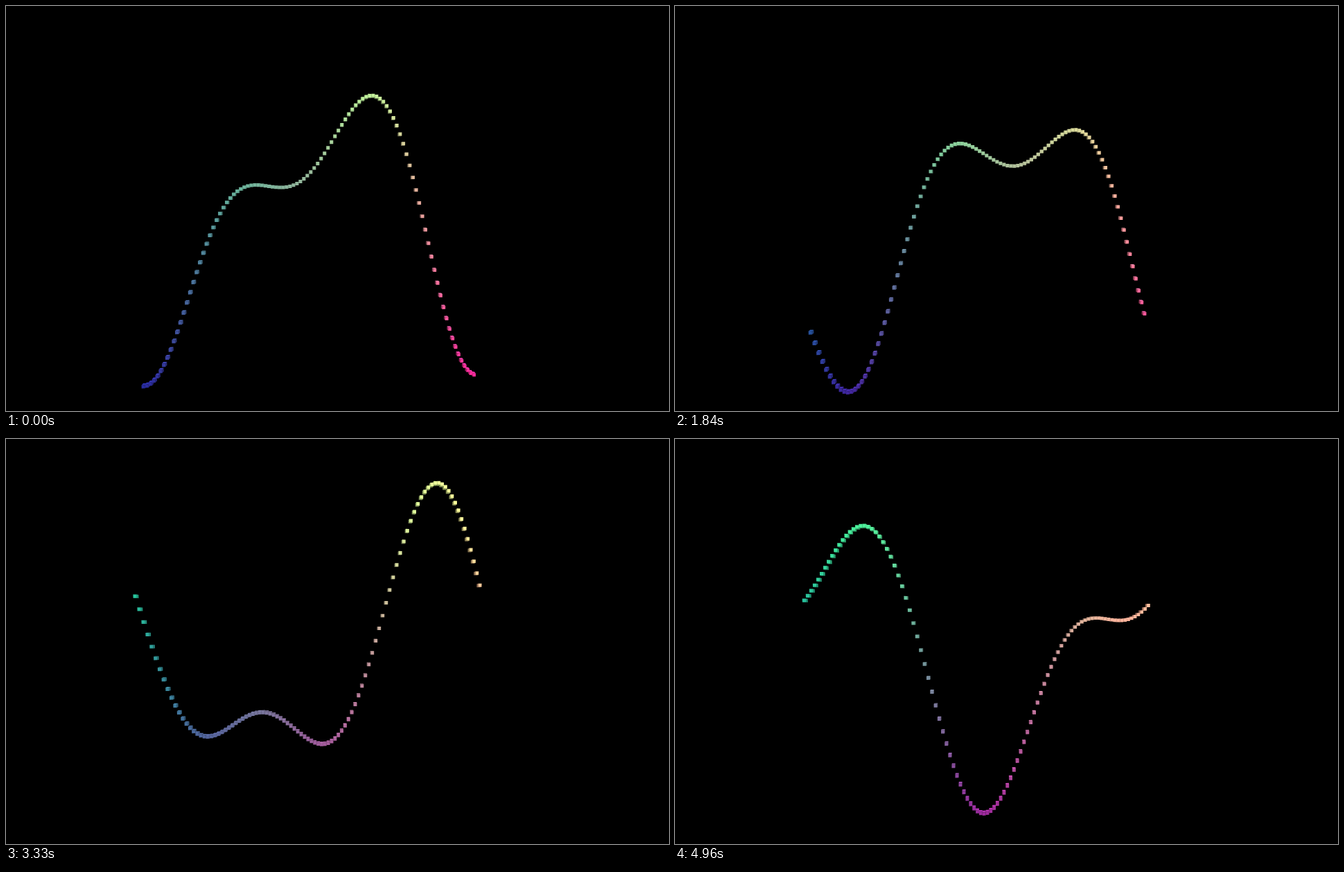
An HTML page with a canvas for the animation above (5040 ms loop, 957 by 585 pixels).

```html
<!DOCTYPE html>
<html lang="en">
<head>
<meta charset="utf-8">
<title>Sine graph</title>
<style>
  html, body { margin: 0; height: 100%; overflow: hidden; background: #000; }
  canvas { display: block; }
</style>
</head>
<body>
<canvas id="stage" width="957" height="585"></canvas>
<script>
const ctx = document.getElementById('stage').getContext('2d');
const { sin, cos, PI, abs, round } = Math;

const LOOP = 5040, STEPS = 65, COUNT = 100, HALF = 0.01;

// [step, start in ms]: steps between two entries are evenly spread
const STARTS = [
  [0, 0], [1, 70], [7, 530], [8, 610], [13, 990], [14, 1070], [15, 1160],
  [21, 1610], [22, 1690], [24, 1840], [25, 1920], [28, 2160], [29, 2240],
  [31, 2410], [32, 2460], [35, 2700], [36, 2780], [42, 3250], [43, 3330],
  [44, 3430], [49, 3800], [50, 3880], [55, 4260], [56, 4350], [57, 4430],
  [63, 4890], [64, 4960]
];
// [step, wave time in s]
const WAVE = [
  [0, 0.394], [13, 1.409], [24, 2.273], [31, 2.819],
  [43, 3.7665], [55, 4.698], [64, 5.394]
];

function lerpAt(knots, k) {
  let i = 1;
  while (i < knots.length - 1 && knots[i][0] < k) i++;
  const [k0, v0] = knots[i - 1], [k1, v1] = knots[i];
  return v0 + (v1 - v0) * (k - k0) / (k1 - k0);
}
const steps = Array.from({ length: STEPS }, (_, k) => ({
  start: round(lerpAt(STARTS, k) / 10) * 10,
  time: lerpAt(WAVE, k)
}));

// Perspective camera, turned slightly right and down
const FOCAL = 506.6, YAW = 0.061, PITCH = 0.065;
const ORIGIN = [-0.145, -0.083, 2.055];
const RIGHT = [cos(YAW), 0, -sin(YAW)];
const UP = [sin(YAW) * sin(PITCH), cos(PITCH), cos(YAW) * sin(PITCH)];
const FORWARD = [sin(YAW) * cos(PITCH), -sin(PITCH), cos(YAW) * cos(PITCH)];
const dot = (a, b) => a[0] * b[0] + a[1] * b[1] + a[2] * b[2];
const eye = [0, 1, 2].map(i =>
  -(ORIGIN[0] * RIGHT[i] + ORIGIN[1] * UP[i] + ORIGIN[2] * FORWARD[i]));

function project(x, y, z) {
  const p = [x, y, z];
  const scale = FOCAL / (ORIGIN[2] + dot(p, FORWARD));
  return [
    478.5 + scale * (ORIGIN[0] + dot(p, RIGHT)),
    292.5 - scale * (ORIGIN[1] + dot(p, UP))
  ];
}

function quad(corners, color) {
  ctx.fillStyle = color;
  ctx.beginPath();
  for (const c of corners) ctx.lineTo(...project(...c));
  ctx.fill();
}

function shade(x, y, light) {
  const channel = v => Math.min(255, round((38 + 235 * v) * light));
  return `rgb(${channel(0.5 + x / 2)},${channel(0.5 + y / 2)},${channel(0.5)})`;
}

function drawCube(x, y) {
  const l = x - HALF, r = x + HALF, b = y - HALF, t = y + HALF;
  const n = -HALF, f = HALF;
  const side = (sx, light) =>
    quad([[sx, b, n], [sx, t, n], [sx, t, f], [sx, b, f]], shade(x, y, light));
  const cap = (sy, light) =>
    quad([[l, sy, n], [r, sy, n], [r, sy, f], [l, sy, f]], shade(x, y, light));
  if (eye[0] < l) side(l, 0.55);
  if (eye[0] > r) side(r, 0.77);
  if (eye[1] > t) cap(t, 1.15);
  if (eye[1] < b) cap(b, 0.55);
  quad([[l, b, n], [r, b, n], [r, t, n], [l, t, n]], shade(x, y, 1));
}

const wave = (x, t) =>
  (sin(PI * (x + t)) + sin(2 * PI * (x + 2 * t)) / 2) * 2 / 3;

// Outer cubes first, so that inner neighbours cover their sides
const columns = Array.from({ length: COUNT }, (_, i) => (i + 0.5) * 2 / COUNT - 1)
  .sort((a, b) => abs(b - eye[0]) - abs(a - eye[0]));

const begin = performance.now();
function frame() {
  const ms = (performance.now() - begin) % LOOP;
  const { time } = steps.findLast(s => s.start <= ms);
  ctx.fillStyle = '#000';
  ctx.fillRect(0, 0, 957, 585);
  for (const x of columns) drawCube(x, wave(x, time));
  requestAnimationFrame(frame);
}
frame();
</script>
</body>
</html>
```
